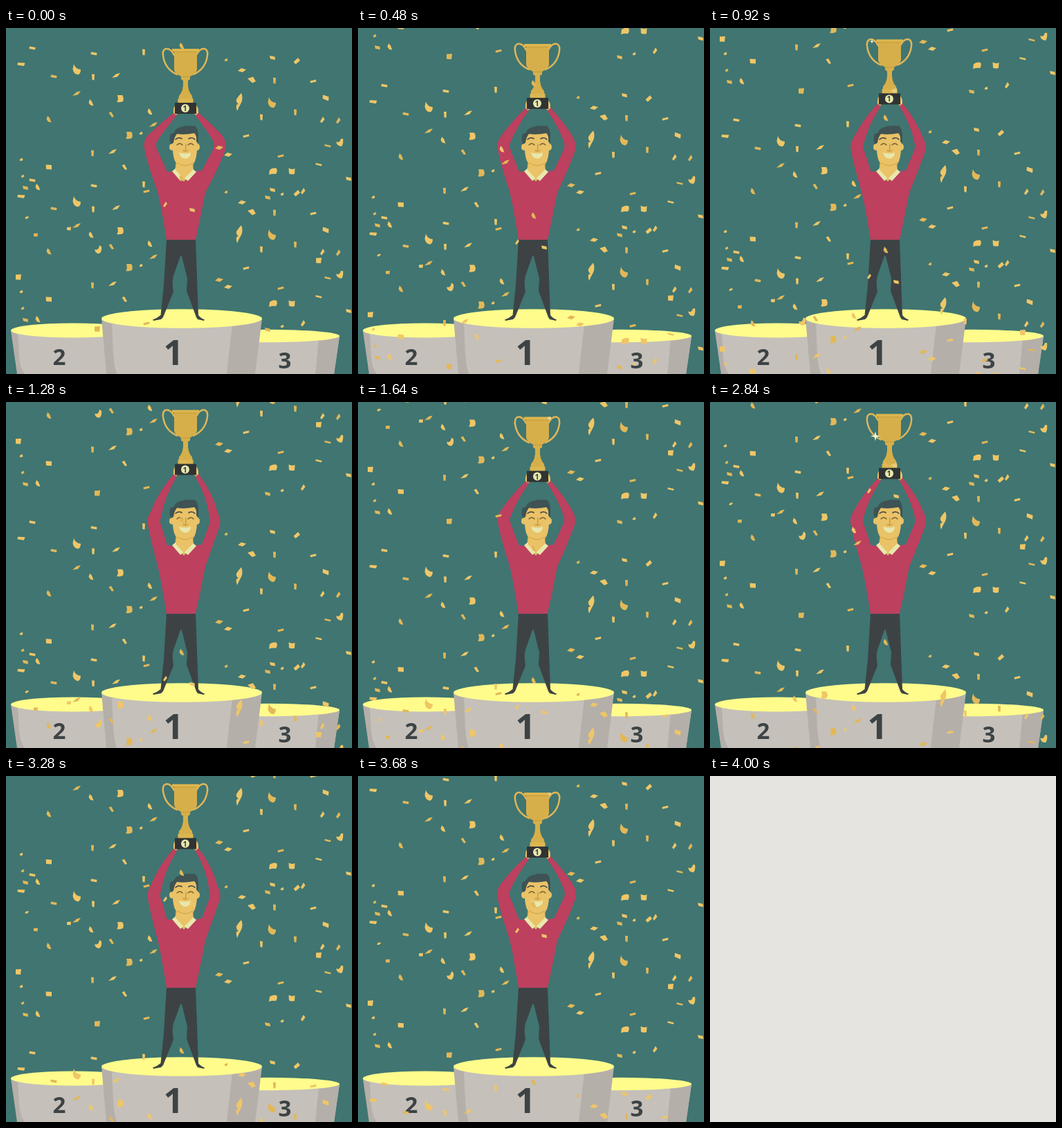
Write an HTML page with a canvas that moves like this. It is 500x500 px and loops after 4040 ms.

```html
<!DOCTYPE html>
<html lang="en">
<head>
<meta charset="utf-8">
<title>Winner on the podium</title>
<style>
html, body { margin: 0; width: 100%; height: 100%; overflow: hidden; background: #407571; }
canvas { display: block; width: 500px; height: 500px; }
</style>
</head>
<body>
<canvas id="stage" width="500" height="500"></canvas>
<script>
const ctx = document.getElementById('stage').getContext('2d');
const LOOP = 4040, STEP = 40, BLANK = 4000;
const FALL = 3960, TILE = 448, COPY = 191, SWING = 1980, LIFT = 18.5;
const INK = '#3d4345', SKIN = '#eac267', GOLD = '#d7af4a', PALE = '#e8e8ae';

function fill(d, color) {
  ctx.fillStyle = color;
  ctx.fill(new Path2D(d));
}
function line(d, color, width) {
  ctx.strokeStyle = color;
  ctx.lineWidth = width;
  ctx.lineCap = 'round';
  ctx.stroke(new Path2D(d));
}
function oval(x, y, rx, ry, color) {
  ctx.fillStyle = color;
  ctx.beginPath();
  ctx.ellipse(x, y, rx, ry, 0, 0, Math.PI * 2);
  ctx.fill();
}
function digit(s, x, y, size, color) {
  ctx.fillStyle = color;
  ctx.font = `bold ${size}px "Open Sans", "Noto Sans", sans-serif`;
  ctx.textAlign = 'center';
  ctx.fillText(s, x, y);
}

// Confetti: outline around the centre, then x, y pairs at the start of the fall
const confetti = [
  { d: 'M-4 -2.5L4.5 -1L4 2.5L-4.5 1Z',
    at: [38,29, 69,70, 127,37] },
  { d: 'M-5 -2L5.5 -1.5L4 3L-5.5 1.5Z',
    at: [22,52] },
  { d: 'M-4.5 -.5L4 -2.5L4.5 .5L-4 2.5Z',
    at: [347,156, 397,185, 444,77, 203,236] },
  { d: 'M-4.5 -2L4.5 0L4 2.5L-4.5 .5Z',
    at: [452,197, 465,170] },
  { d: 'M-6 3L0 -2.5L6 -4L2 1.5Z',
    at: [159,69, 102,95, 154,179, 213,140] },
  { d: 'M-6 1L-1 -3L6 -1L1 3Z',
    at: [341,61, 308,173, 321,183] },
  { d: 'M-6 -2L2 -4.5L6 2L1 4.5Z',
    at: [355,75] },
  { d: 'M-4.5 1L2 -5L5 -1L-1.5 4.5Z',
    at: [420,48] },
  { d: 'M-2 -4.5L2 -4L1.5 4.5L-1.5 4Z',
    at: [126,71, 125,181, 199,35, 388,76, 369,129, 418,122] },
  { d: 'M-2 -5L1 -2L3.5 4.5L-1 3.5L-3.5 0Z',
    at: [123,108, 62,132, 208,121, 254,26, 46,230] },
  { d: 'M1 -5L3.5 -1L-1 4.5L-3 2Z',
    at: [457,133, 480,134, 429,236] },
  { d: 'M-3.5 -2.5L0 -4L4 3L1 4Z',
    at: [171,201, 152,125] },
  { d: 'M-4 -3L3.5 -1.5L4 3L-3 1.5Z',
    at: [385,43, 378,245, 495,218, 28,231] },
  { d: 'M-4.5 -3.5L4 -3L4 3.5L-4 3Z',
    at: [62,201] },
  { d: 'M-4 -4.5L4.5 -1.5L4 4.5L-4.5 1Z',
    at: [462,101] },
  { d: 'M-2.5 0L1.5 -2.5L2.5 1L-1 2.5Z',
    at: [195,152, 318,46, 399,240, 24,214, 22,190] },
  { d: 'M-4 -5L3 -5Q6 -1 4 4Q0 6 -5 5Q-2 2 -4 -5Z',
    at: [165,102, 178,155] },
  { d: 'M-5 -2Q0 -6 5 -4Q7 0 4 4Q-1 3 -6 5Z',
    at: [386,207] },
  { d: 'M-4.5 -4.5Q0 -2 4.5 -4L4 4Q0 5 -4 3.5Z',
    at: [413,207] },
  { d: 'M-4 -8Q-2 -1 6 0Q6 6 2 7.5Q-5 6 -5.5 -1Z',
    at: [102,60, 384,108] },
  { d: 'M-5 -1Q0 2 2 -5L5 -5Q6 2 3 6Q-4 6 -5 -1Z',
    at: [482,165] },
  { d: 'M3 -13Q6 -6 3 1Q0 6 -3 13Q-5 8 -4 4L-1 3Q-5 0 -4 -4Q-1 -9 3 -13Z',
    at: [337,107] }
];
// Pieces that fall only once per tile
const singles = [
  { d: 'M-5 0Q1 2 2 -6L5 -4Q6 3 2 6Q-4 6 -5 0Z', at: [133,320] },
  { d: 'M-4 -3.5L4 -4L3 4L-4 3.5Z', at: [18,360, 132,435, 452,336] },
  { d: 'M-3 -2L3 -2.5L2.5 2.5L-3 2Z', at: [91,290, 43,299] },
  { d: 'M-3 1L0 -2L3.5 -1L0 2Z', at: [30,274] },
  { d: 'M1 -4L3 -1L-1 4L-3 2Z', at: [230,255] },
  { d: 'M-4 -3L3.5 -1.5L4 3L-3 1.5Z', at: [269,263] }
];

function pieces(set, copies, t) {
  for (const { d, at } of set) {
    const path = new Path2D(d);
    for (let i = 0; i < at.length; i += 2) {
      ctx.fillStyle = i % 4 ? '#e2b858' : '#efc667';
      for (const shift of copies) {
        for (const back of [0, TILE]) {
          const y = at[i + 1] + shift - back + TILE * t / FALL;
          if (y < -15 || y > 515) continue;
          ctx.save();
          ctx.translate(at[i], y);
          ctx.fill(path);
          ctx.restore();
        }
      }
    }
  }
}

function podium() {
  const top = '#fffc8c', light = '#c5c0ba', shade = '#b5afa9';
  fill('M7 437L16 500H190V437Z', shade);
  fill('M17 442L19 475Q20 490 27 500H190V442Z', light);
  oval(97, 437, 90, 10.5, top);
  fill('M280 445V500H474L482 445Z', light);
  fill('M452 449L447 500H474L482 445Z', shade);
  oval(379, 445, 103, 9.3, top);
  fill('M138 420L145 500H360L370 420Z', shade);
  fill('M153 428L155 470Q156 488 160 500H319L327 428Z', light);
  oval(254, 420, 116, 13.8, top);
  digit('2', 77, 487, 33, INK);
  digit('1', 242, 487, 51, INK);
  digit('3', 403, 492, 33, INK);
}

function legs() {
  fill('M232 305L228 372L223.5 415Q219 419 212 421.5L213 423L224 421L227 418L242 381Q239 364 243 355L252 330' +
       'Q253 328 254 330L262 362L261 380L275 418L277 421L286 423L287 421.5Q281 419 278 415L274 305Z', INK);
}

// up: 0 when the arms are low, 1 when they are stretched
function sweater(up) {
  const hand = 122 - LIFT * up, ey = 167 + 3 * up;
  const l = 199 + 5 * up, r = 318 - 8 * up;
  const li = 216 + 6 * up, ri = 302 - 6 * up;
  const bend = 2 + 5 * up, midY = (hand + ey) / 2 - 2;
  fill(`M243 ${hand}Q${(l + 248) / 2 - bend} ${midY - 3} ${l + 5} ${ey - 11}` +
       `Q${l - 1} ${ey - 2} ${l + 1} ${ey + 7}` +
       `Q${l + 5} ${ey + 29} 219 236Q224 256 232 306H274Q281 274 288 238` +
       `Q${r - 10} ${ey + 34} ${r - 1} ${ey + 9}Q${r + 1} ${ey - 1} ${r - 4} ${ey - 10}` +
       `Q${(r + 274) / 2 + bend} ${midY - 3} 278 ${hand}L274 ${hand + 5}` +
       `Q${(ri + 272) / 2 + bend} ${midY + 3} ${ri - 2} ${ey - 3}Q${ri} ${ey + 3} ${ri - 3} ${ey + 9}` +
       `L283 206L274 207L257 222L240 207L233 208L${li + 3} ${ey + 10}` +
       `Q${li - 1} ${ey + 2} ${li + 2} ${ey - 3}` +
       `Q${(li + 249) / 2 - bend} ${midY + 3} 247 ${hand + 4}Z`, '#bd405f');
}

function head() {
  fill('M246 190L244 208L257 222L271 207L270 190Z', '#e3b654');
  fill('M246 202L240 207L252 221L257 217Z M268 202L275 208L263 221L257 217Z', PALE);
  fill('M247 197L245 205L257 218L270 205L269 194Z', SKIN);
  oval(239.5, 172, 3.5, 5, SKIN);
  oval(276.5, 172, 3.5, 5, SKIN);
  fill('M241 152Q239 190 247 196Q259 205 271 196Q277 189 277 152Q259 145 241 152Z', SKIN);
  fill('M238 168Q235 157 238 153Q242 153 245 147Q253 140 273 141.5L276 145Q279 153 277.5 167' +
       'L275 164Q276 155 272 152Q258 155 247 153Q243 158 242 166Z', '#3f5254');
  line('M245 161Q250 157 254 160M264 160Q269 157 273 161', INK, 1.6);
  line('M247 169Q251 165 255 169M263 169Q267 165 271 169', '#76602f', 1.3);
  line('M260 168L259.5 177M256 177Q260 179 263 177', '#c99a3d', 1.5);
  fill('M250 180Q259 183 267 180Q267 188 259 189Q252 188 250 180Z', PALE);
  line('M248 195Q259 203 270 195', '#d3a146', 1);
}

function star(x, y, size) {
  const q = size * .2;
  fill(`M${x} ${y - size}L${x + q} ${y - q}L${x + size} ${y}L${x + q} ${y + q}` +
       `L${x} ${y + size}L${x - q} ${y + q}L${x - size} ${y}L${x - q} ${y - q}Z`, '#fbf5d2');
}

function pulse(p, from, to) {
  return p > from && p < to ? Math.sin(Math.PI * (p - from) / (to - from)) : 0;
}

function trophy(up, p) {
  ctx.save();
  ctx.translate(0, -LIFT * up);
  const handle = 'M243 39Q238 29 231 30Q225 32 227.5 43Q231 60 247 67';
  line(handle, '#dfb65a', 2.5);
  ctx.save();
  ctx.translate(518, 0);
  ctx.scale(-1, 1);
  line(handle, '#dfb65a', 2.5);
  ctx.restore();
  fill('M243 32H276V60Q275 66 266 70V74L263 76Q262 91 269 98L270 108H249L250 98' +
       'Q257 91 256 76L253 74V70Q244 66 243 60Z', GOLD);
  fill('M240 30H279V34H240Z M248.5 102H270.5V108H248.5Z', '#dcb650');
  line('M253 70.5H266M244 34.5H275', '#c69b38', 1);
  fill('M247 110Q241 113 242 123L246 126L249 122Z M272 110Q279 113 278 123L274 126L270 122Z', SKIN);
  fill('M244 108H275V124H244Z', '#303334');
  oval(259, 116, 6, 6, PALE);
  digit('1', 258.6, 120, 11, INK);
  const sparks = [[239, 62, 8.5, .38, .46], [234, 33, 8.5, .453, .54]];
  for (const [x, y, size, from, to] of sparks) {
    const s = pulse(p, from, to);
    if (s) star(x, y, size * s);
  }
  ctx.globalAlpha = .6 * pulse(p, .38, .53);
  fill('M261 104L270 100L270 107L265 107Z', '#f3dd94');
  ctx.globalAlpha = .6 * pulse(p, .78, .88);
  fill('M274 30H279V34H275Z', '#f8e8ad');
  ctx.restore();
}

// Slow steady lift, then a softer and quicker drop
function lift(p) {
  const turn = .635;
  return p < turn ? p / turn : (1 + Math.cos(Math.PI * (p - turn) / (1 - turn))) / 2;
}

function draw(now) {
  const t = Math.floor((now % LOOP) / STEP) * STEP;
  ctx.fillStyle = t >= BLANK ? '#e5e4e0' : '#407571';
  ctx.fillRect(0, 0, 500, 500);
  if (t < BLANK) {
    const p = t % SWING / SWING, up = lift(p);
    podium();
    legs();
    sweater(up);
    head();
    trophy(up, p);
    pieces(confetti, [0, COPY], t);
    pieces(singles, [0], t);
  }
}

let start;
function tick(now) {
  if (start === undefined) start = now;
  draw(now - start);
  requestAnimationFrame(tick);
}
requestAnimationFrame(tick);
</script>
</body>
</html>
```
